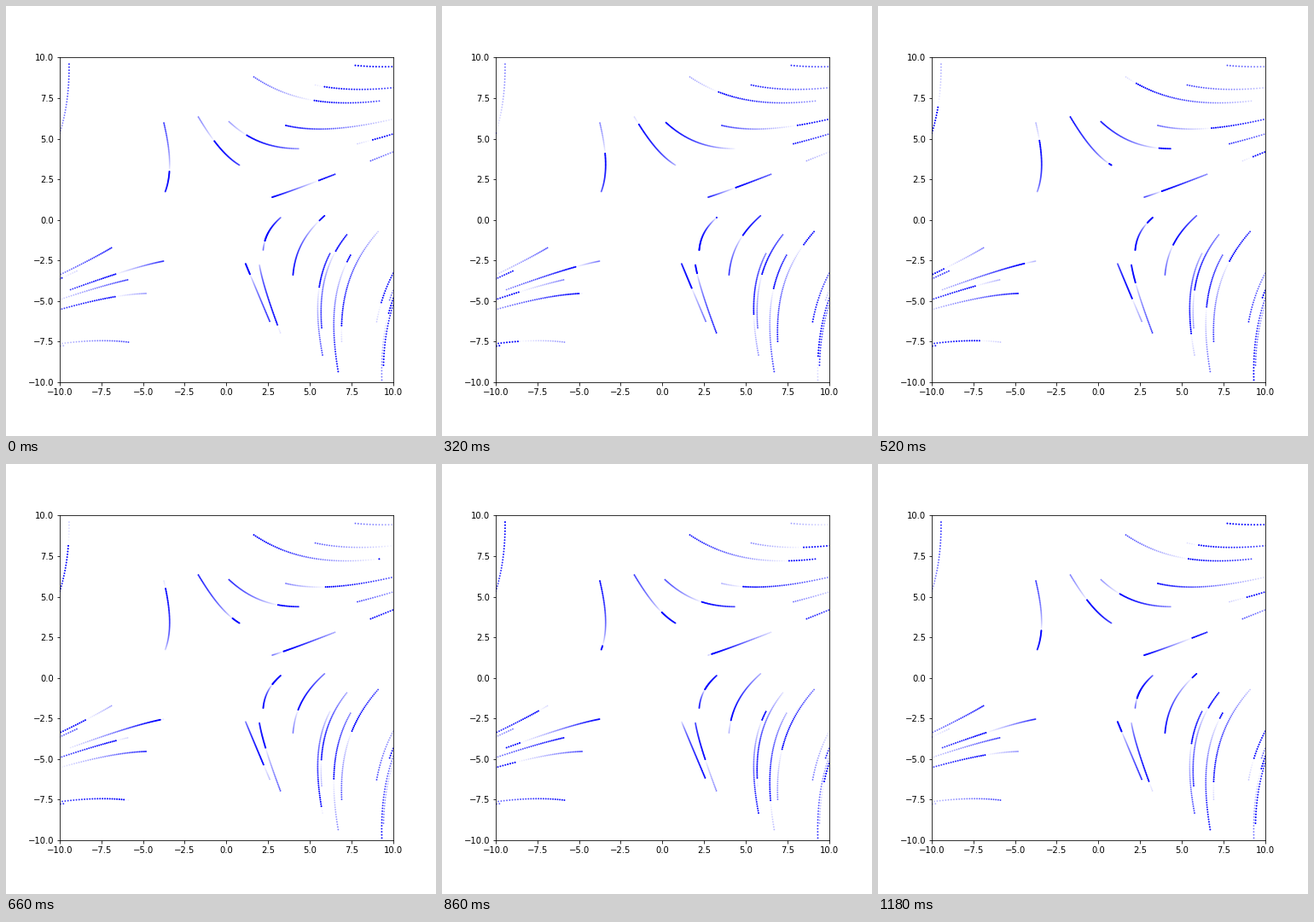
Recreate the animation shown at these times as a matplotlib script. Size 504 by 504 pixels, loop 1200 ms.

```python
import numpy as np
import matplotlib.pyplot as plt
from matplotlib.animation import FuncAnimation

STEPS = 60     # points per trail, also frames per loop
DT = 0.01

# Where each trail ends (x, y) and the frame at which its head gets there
TRAILS = np.array([
    (-3.75, 5.97, 38), (-9.44, 9.60, 41), (2.75, 1.40, 48), (1.65, 8.81, 32),
    (-1.68, 6.34, 22), (0.16, 6.05, 17), (3.57, 5.82, 56), (7.74, 9.52, 59),
    (5.34, 8.31, 4), (7.87, 4.69, 7), (8.66, 3.64, 31), (2.21, -1.86, 15),
    (4.00, -3.38, 54), (2.60, -6.24, 44), (3.24, -6.95, 5), (5.77, -8.32, 36),
    (5.72, -6.64, 47), (6.71, -9.34, 55), (6.92, -7.48, 7), (9.02, -6.27, 8),
    (9.43, -8.95, 58), (9.33, -9.86, 24), (9.80, -4.93, 27),
    (-6.90, -1.72, 49), (-8.98, -3.15, 7), (-3.78, -2.54, 36),
    (-5.93, -3.69, 40), (-4.83, -4.53, 18), (-5.88, -7.53, 35),
    (-9.78, -7.75, 12),
])


def trail_points(x, y, back):
    """Saddle flow x' = -x - y, y' = y - x, followed `back` steps into the past."""
    r = np.sqrt(2)
    c = np.cosh(r * DT * back)
    s = np.sinh(r * DT * back) / r
    return c * x + s * (x + y), c * y + s * (x - y)


back = np.arange(STEPS)
end_x, end_y, arrival = (col[:, None] for col in TRAILS.T)
px, py = trail_points(end_x, end_y, back)

fig = plt.figure(figsize=(7, 7), dpi=72)
ax = fig.add_axes([0.125, 0.125, 0.775, 0.755])
ax.set(xlim=(-10, 10), ylim=(-10, 10))
ticks = np.arange(-10, 10.1, 2.5)
ax.set_xticks(ticks)
ax.set_yticks(ticks)

colors = np.zeros((px.size, 4))
colors[:, 2] = 1
dots = ax.scatter(px.ravel(), py.ravel(), s=1, c=colors)


def update(frame):
    # Each dot lights up as the head passes, then fades linearly
    age = (back - (arrival - frame)) % STEPS
    colors[:, 3] = (1 - age / STEPS).ravel()
    dots.set_facecolor(colors)
    dots.set_edgecolor(colors)
    return [dots]


anim = FuncAnimation(fig, update, frames=STEPS, interval=20, repeat=True,
                     repeat_delay=0)
plt.show()
```
